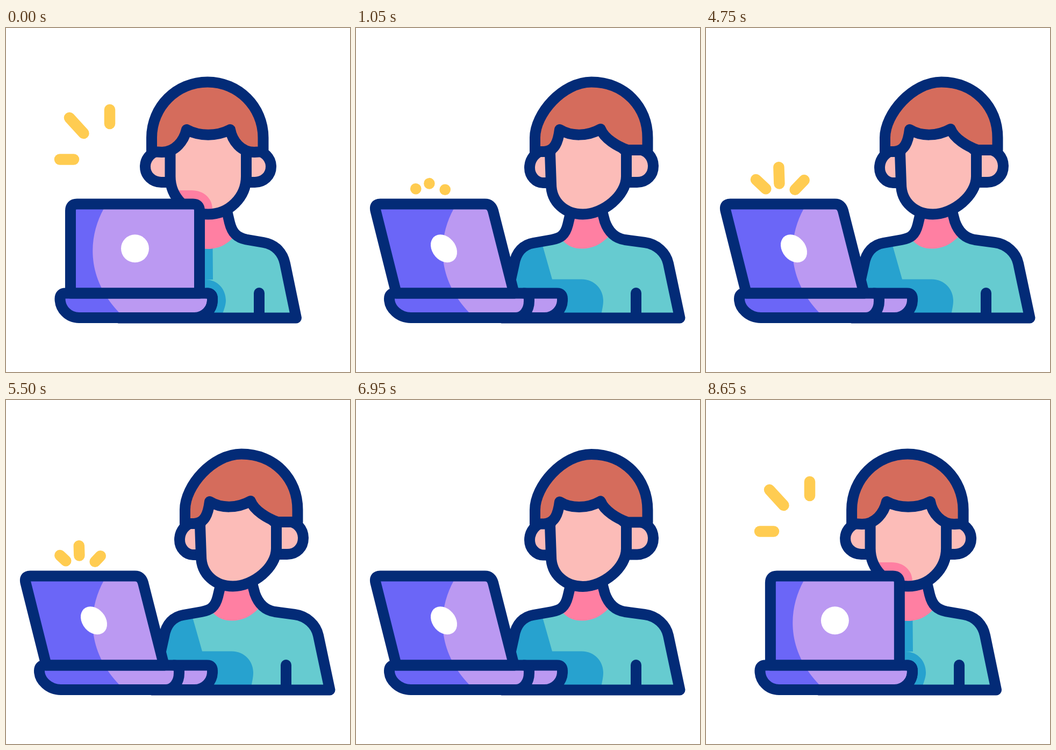
Animation of 640x640 px, one loop 8700 ms. Source, as an HTML page:

```html
<!DOCTYPE html>
<html lang="en">
<head>
<meta charset="utf-8">
<title>Person at a laptop</title>
<style>
  html, body { margin: 0; width: 100%; height: 100%; overflow: hidden; background: #fff; }
  svg { display: block; width: 100vw; height: 100vh; }
  .line { stroke: #032b77; stroke-width: 20; stroke-linecap: round; stroke-linejoin: round; }
  .open { fill: none; }
  .skin { fill: #fcbcb8; }
  .hair { fill: #d56c5c; }
  .pink { fill: #ff7fa2; }
  .teal { fill: #66cbd0; }
  .blue { fill: #27a2cf; }
  .indigo { fill: #6b66f7; }
  .lilac { fill: #bb99f2; }
  .spark { stroke: #ffcc51; stroke-width: 20.5; stroke-linecap: round; }
</style>
</head>
<body>
<!-- d is the facing pose, data-b the turned pose -->
<svg viewBox="0 0 640 640">
  <defs>
    <path id="body"
      d="M338 345 L334 362 C329 385 313 391 297 394 L270 399 C248 403 234 419 230 438 L210 539.5 L540 539.5 L519 438 C515 419 502 403 479 399 L447 393.5 C430 390 421 382 416 362 L412 345"
      data-b="M399 345 L394 366 C389 386 380 391 364 394 L330 400 C312 403 298 416 294 440 L272 539.5 L602.5 539.5 L581 438 C577 419 560 402 537 399 L500 394 C482 391 470 380 463 360 L459 345"/>
    <path id="shadow"
      d="M60 302 H345 C368 302 384 317 384 337 L385 468 H370 C395 468 409 487 409 507 C409 516 405 526 400 539 H60 Z"
      data-b="M60 302 H283 C305 302 319 313 327 334 L365 467.5 H420 C445 468 460 487 460 507 C460 516 458 524 455 539 H60 Z"/>
    <path id="face"
      d="M305.5 231 L305.5 276 C305.5 315 337 346.5 376 346.5 C415 346.5 447 315 447 276 V231 L417 189 H336 Z"
      data-b="M361 232 L363 290 C363 325 390 346.5 422 346.5 C460 346.5 503 312 503 276 V230 L455 189 H379 Z"/>
    <path id="screen"
      d="M120 493.5 L120 340 Q120 327.5 132 327.5 H348 Q360 327.5 360 340 L360 493.5 Z"
      data-b="M75 493.5 L36.5 340 Q33.5 327.5 45 327.5 H240 Q251.5 327.5 255 340 L294 493.5 Z"/>
    <path id="base"
      d="M110.5 493.5 H374 Q384 493.5 384 503.5 V506 C384 524 369 539 351 539 H136 C116 539 100.5 523 100.5 503.5 Q100.5 493.5 110.5 493.5 Z"
      data-b="M72 493.5 H374 Q384 493.5 384 503.5 V506 C384 524 369 539 351 539 H102 C80 539 62 522 62 503.5 Q62 493.5 72 493.5 Z"/>
    <clipPath id="inBody"><use href="#body"/></clipPath>
    <clipPath id="inFace"><use href="#face"/></clipPath>
    <clipPath id="inLaptop"><use href="#screen"/><use href="#base"/></clipPath>
  </defs>

  <g id="sparks"></g>

  <use href="#body" class="teal"/>
  <g clip-path="url(#inBody)">
    <use href="#shadow" class="blue"/>
    <path class="pink"
      d="M338 335 H412 L424 388 C410 405 392 411 376 411 C358 411 340 405 327 390 Z"
      data-b="M399 335 H459 L470 388 C455 403 440 410.5 420 410.5 C405 410.5 395 406 385 396 Z"/>
  </g>
  <use href="#body" class="line open"/>
  <path class="line open" d="M471 493 V539" data-b="M521 493 V539"/>

  <g id="head">
    <path class="line skin"
      d="M305 228 H289 C273 228 259 241 259 258 C259 275 273 287 289 287 H305"
      data-b="M361 228 H348 C335 230 323 243 323 260 C323 276 335 288 348 288 H361"/>
    <path class="line skin"
      d="M447 228 H463 C479 228 493 241 493 258 C493 275 479 287 463 287 H447"
      data-b="M503 226 H523 C541 226 553 240 553 257 C553 274 541 287 523 287 H503"/>
    <use href="#face" class="skin"/>
    <g clip-path="url(#inFace)"><use id="faceShade" href="#shadow" class="pink"/></g>
    <use href="#face" class="line open"/>
    <path class="line hair"
      d="M271 230 V204 C271 146.5 317.5 100.5 375 100.5 C432 100.5 478.5 146.5 478.5 204 V230 L462 231 C437 231 421 210 417 189 C392 202 360 202 336 189 C331 210 315 231 290 231 Z"
      data-b="M333 230 V204 C333 160 384 100.5 438 100.5 C500 100.5 542.5 147 542.5 204 V227 L505 227 C486 220 462 206 455 188 C430 202 400 202 379 189 C376 212 370 229 350 230 Z"/>
  </g>

  <use href="#screen" class="indigo"/>
  <use href="#base" class="indigo"/>
  <path class="lilac" clip-path="url(#inLaptop)" d="M182 327 V336 C152 390 149 466 211 530 L220 540 H400 V327 Z"/>
  <circle id="dot" r="26" fill="#fff"/>
  <use href="#screen" class="line open"/>
  <use href="#base" class="line open"/>
  <path class="line open"
    d="M374 493.5 Q384 493.5 384 503.5 V506 C384 524 369 539 351 539"
    data-b="M312 493.5 Q322 493.5 322 503.5 V508 C322 525 312 539 297 539"/>
</svg>
<script>
const LOOP = 8700;
const $ = id => document.getElementById(id);
const lerp = (a, b, k) => a + (b - a) * k;
const ease = x => x * x * (3 - 2 * x);

// Each track is a list of [time, value], eased between steps.
const pulse = [[1000, 0]];
for (let i = 0; i <= 6; i++) pulse.push([2000 + i * 500, i % 2 ? 0.67 : 1]);
pulse.push([6000, 0]);

const tracks = {
  turn: [[0, 0], [1000, 1], [7450, 1], [8680, 0]],
  nod: [[6000, 0], [6500, 15], [7000, 0], [7460, 15], [8680, 0]],
  pulse
};

function at(track, t) {
  const i = track.findIndex(step => step[0] > t);
  if (i < 0) return track[track.length - 1][1];
  if (i === 0) return track[0][1];
  const [t0, v0] = track[i - 1], [t1, v1] = track[i];
  return lerp(v0, v1, ease((t - t0) / (t1 - t0)));
}

const number = /-?\d+\.?\d*/g;
const morphs = [...document.querySelectorAll('[data-b]')].map(el => ({
  el,
  shape: el.getAttribute('d'),
  goal: el.dataset.b.match(number).map(Number)
}));

// Sparks grow from a fixed inner end: x, y, dx, dy.
function makeSparks(list) {
  return list.map(([x, y, dx, dy]) => {
    const el = document.createElementNS('http://www.w3.org/2000/svg', 'line');
    el.setAttribute('class', 'spark');
    el.setAttribute('x1', x);
    el.setAttribute('y1', y);
    $('sparks').append(el);
    return { el, x, y, dx, dy };
  });
}
const farSparks = makeSparks([[126, 244.5, -26, 0], [144.5, 196, -26.5, -29], [193, 178, 0, -26]]);
const nearSparks = makeSparks([[111.3, 299.3, -22, -20.7], [136.4, 289.4, -1.2, -36.4], [165.6, 300.8, 20.4, -21.2]]);

function growSparks(sparks, k) {
  for (const { el, x, y, dx, dy } of sparks) {
    el.style.display = k > 0.0005 ? '' : 'none';
    el.setAttribute('x2', x + dx * k);
    el.setAttribute('y2', y + dy * k);
  }
}

function draw(t) {
  const turn = at(tracks.turn, t), nod = at(tracks.nod, t);
  for (const { el, shape, goal } of morphs) {
    let i = 0;
    el.setAttribute('d', shape.replace(number, n => lerp(+n, goal[i++], turn).toFixed(2)));
  }
  $('head').setAttribute('transform', `translate(0 ${nod})`);
  $('faceShade').setAttribute('transform', `translate(0 ${-nod})`);
  $('dot').setAttribute('transform',
    `matrix(${lerp(1, 0.91, turn)} 0 ${0.25 * turn} 1 ${lerp(240, 163.5, turn)} 410.3)`);
  growSparks(farSparks, 1 - turn);
  growSparks(nearSparks, at(tracks.pulse, t));
}

function tick() {
  draw(performance.now() % LOOP);
  requestAnimationFrame(tick);
}
tick();
</script>
</body>
</html>
```
